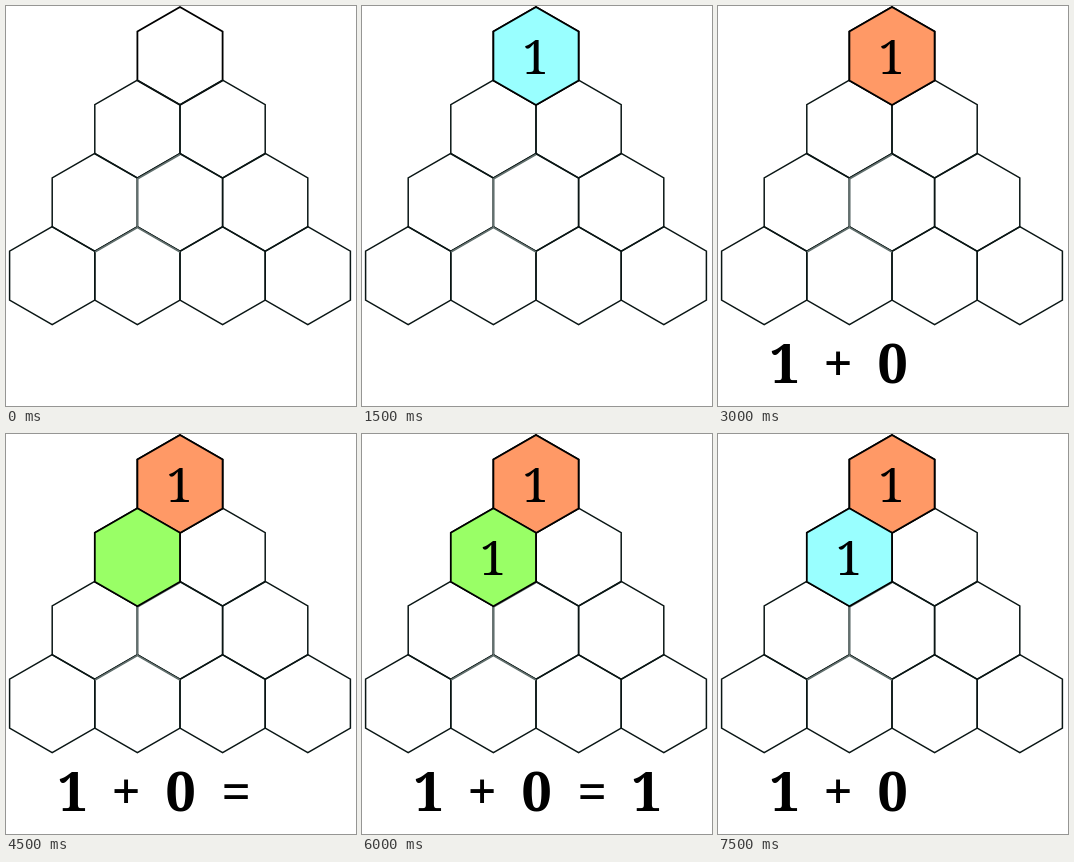
An HTML page with a canvas for the animation above (8 s loop, 350x400 px).

```html
<!DOCTYPE html>
<html lang="en">
<head>
<meta charset="utf-8">
<title>Number triangle</title>
<style>
html, body { margin: 0; width: 100%; height: 100%; overflow: hidden; background: #fff; }
canvas { display: block; width: 350px; height: 400px; }
</style>
</head>
<body>
<canvas width="350" height="400"></canvas>
<script>
const ctx = document.querySelector('canvas').getContext('2d');
const LOOP = 8000, STEP = 1500;
const CYAN = '#99ffff', ORANGE = '#ff9966', GREEN = '#99ff66';
const HALF_WIDTH = 42.6, HALF_HEIGHT = 49, ROW_HEIGHT = 73.2;

// Each step: colour of the top cell, colour of the cell below, its digit, the sum
const steps = [
  {},
  { top: CYAN },
  { top: ORANGE, sum: '1+0' },
  { top: ORANGE, child: GREEN, sum: '1+0=' },
  { top: ORANGE, child: GREEN, digit: true, sum: '1+0=1' },
  { top: ORANGE, child: CYAN, digit: true, sum: '1+0' }
];
const sumCenters = [66.5, 120, 174.5, 230, 284.5];

function center(row, col) {
  return [174 + (col - row / 2) * 2 * HALF_WIDTH, 50 + row * ROW_HEIGHT];
}

function hexagon(row, col, fill) {
  const [x, y] = center(row, col);
  ctx.beginPath();
  for (let i = 0; i < 6; i++) {
    const angle = i * Math.PI / 3;
    ctx.lineTo(x + Math.sin(angle) * HALF_WIDTH / Math.sin(Math.PI / 3),
               y - Math.cos(angle) * HALF_HEIGHT);
  }
  ctx.closePath();
  if (fill) {
    ctx.fillStyle = fill;
    ctx.fill();
  }
  ctx.lineWidth = fill || !row ? 1.8 : 1.5;
  ctx.strokeStyle = fill || !row ? '#000' : '#0a1615';
  ctx.stroke();
}

function paleEdges() {
  ctx.beginPath();
  for (const points of [[174, 148.5, 131.4, 173, 131.4, 221.5, 174, 246], [131.4, 221.5, 89, 246]]) {
    ctx.moveTo(points[0], points[1]);
    for (let i = 2; i < points.length; i += 2) ctx.lineTo(points[i], points[i + 1]);
  }
  ctx.lineWidth = 1.6;
  ctx.strokeStyle = '#62706e';
  ctx.stroke();
}

function text(string, x, baseline, font) {
  ctx.font = font + ' "Noto Serif", serif';
  ctx.textAlign = 'center';
  ctx.fillStyle = '#000';
  ctx.fillText(string, x, baseline);
}

function draw(time) {
  const { top, child, digit, sum = '' } = steps[Math.floor(time / STEP)];
  ctx.fillStyle = '#fff';
  ctx.fillRect(0, 0, 350, 400);
  for (let row = 0; row < 4; row++)
    for (let col = 0; col <= row; col++) hexagon(row, col);
  paleEdges();
  if (top) {
    hexagon(0, 0, top);
    text('1', 173.5, 68, '48px');
  }
  if (child) hexagon(1, 0, child);
  if (digit) text('1', 131, 141, '48px');
  [...sum].forEach((char, i) => text(char, sumCenters[i], 377, 'bold 54px'));
}

const start = performance.now();
function tick() {
  draw((performance.now() - start) % LOOP);
  requestAnimationFrame(tick);
}
tick();
</script>
</body>
</html>
```
